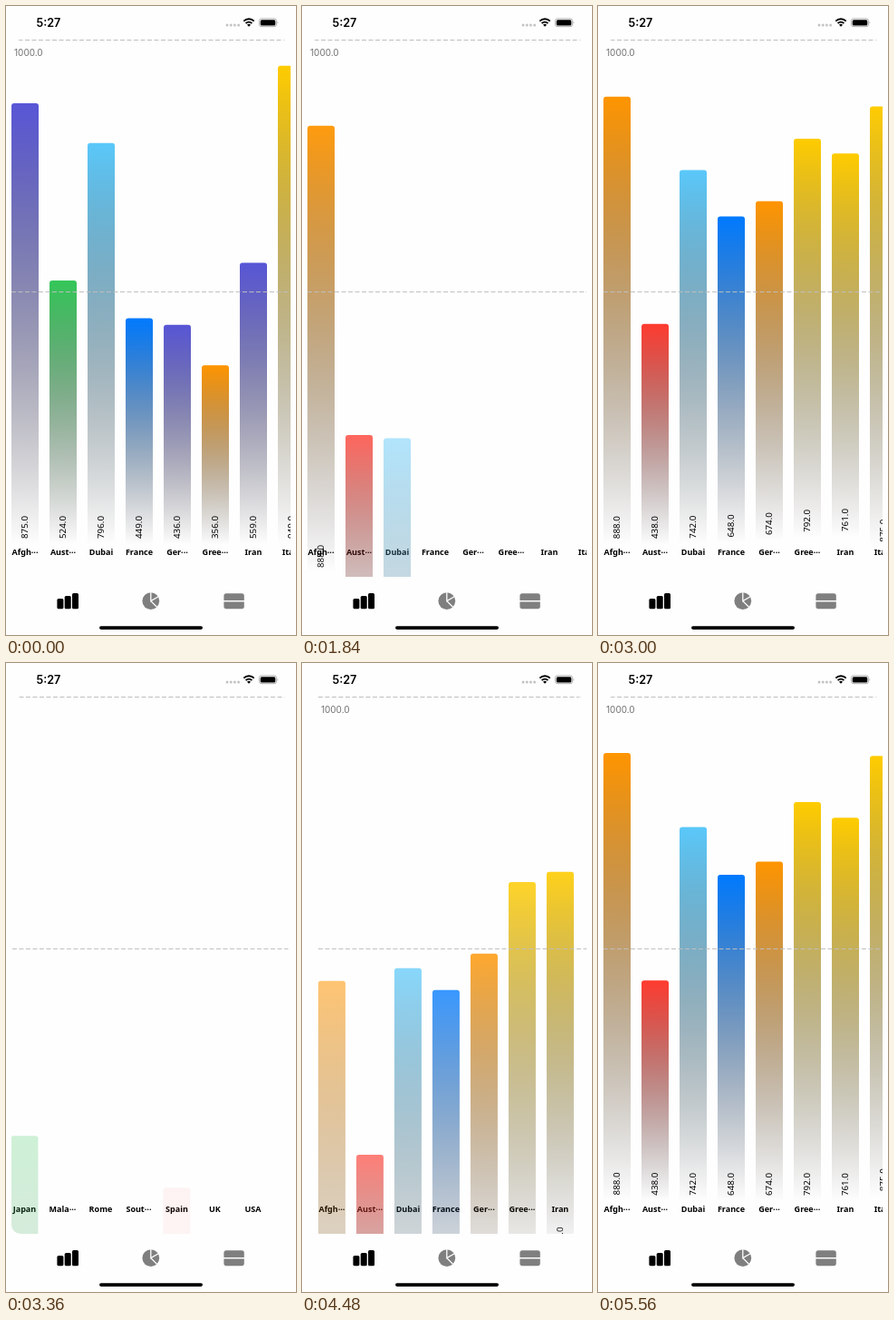
An HTML page that plays this animation: 320x692 px, repeating every 5680 ms.

```html
<!DOCTYPE html>
<html lang="en">
<head>
<meta charset="utf-8">
<title>Bar chart</title>
<style>
  html, body { margin: 0; width: 100%; height: 100%; overflow: hidden; background: #fefefe; }
  svg { display: block; width: 100%; height: 100%; }
  .clock { font: 600 12.6px Inter, sans-serif; }
  .axis { font: 10px Inter, sans-serif; fill: #707070; }
  .name { font: 600 9px "Noto Sans", "Open Sans", sans-serif; text-anchor: middle; }
  .value { font: 9.8px "Noto Sans", "Open Sans", sans-serif; text-anchor: middle; }
  .grid { stroke: #bebebe; stroke-width: 1; stroke-dasharray: 5 2.5; }
</style>
</head>
<body>
<svg viewBox="0 0 320 692" xmlns="http://www.w3.org/2000/svg">
  <defs id="defs">
    <clipPath id="view"><rect x="6" y="37" width="308" height="591" rx="10"/></clipPath>
  </defs>

  <g id="status">
    <text class="clock" x="33.5" y="22.7">5:27</text>
    <g fill="#c4c4c4">
      <circle cx="244" cy="21" r="1.5"/><circle cx="248.2" cy="21" r="1.5"/>
      <circle cx="252.4" cy="21" r="1.5"/><circle cx="256.6" cy="21" r="1.5"/>
    </g>
    <g fill="none" stroke="#000" stroke-width="1.9">
      <path d="M262.3 16.6a8.2 8.2 0 0 1 11.4 0"/>
      <path d="M264.6 19a5 5 0 0 1 6.8 0"/>
    </g>
    <path d="M268 22.8l-2-2.1a2.9 2.9 0 0 1 4 0z"/>
    <rect x="279.4" y="13.9" width="19.2" height="8.8" rx="2.6" fill="none" stroke="#a8a8a8" stroke-width=".9"/>
    <rect x="280.7" y="15.2" width="16.6" height="6.2" rx="1.5"/>
    <path d="M299.6 16.8q1.5 1.5 0 3z" fill="#a8a8a8"/>
  </g>

  <g clip-path="url(#view)">
    <g id="content">
      <text class="axis" x="9" y="55.3">1000.0</text>
      <g id="names"></g>
      <g id="bars"></g>
      <path class="grid" d="M6 37.5H648M6 314.6H648"/>
    </g>
  </g>

  <g id="tabs">
    <rect x="56.4" y="652" width="7" height="11.3" rx="1.6"/>
    <rect x="64.7" y="649" width="7" height="14.3" rx="1.6"/>
    <rect x="73" y="646" width="7" height="17.3" rx="1.6"/>
    <circle cx="159.8" cy="654.6" r="9.4" fill="#7f7f7f"/>
    <path d="M159.8 644.5V654.6L168.6 649.5M159.8 654.6L167.2 662" fill="none" stroke="#fefefe" stroke-width="1.3"/>
    <rect x="240.4" y="646.2" width="22.4" height="17" rx="2.6" fill="#7f7f7f"/>
    <path d="M240 654.7h23.4" stroke="#fefefe" stroke-width="1.5"/>
  </g>
  <rect x="103" y="682.3" width="114" height="3.6" rx="1.8"/>
</svg>

<script>
const LOOP = 5680, REFRESH = 1160, FIRST_START = 1314, STAGGER = 150;
const BASE = 593, UNIT = 0.5555, STEP = 42, TRAVEL = 555, MAX_SCROLL = 310;

const COLORS = {
  purple: '#5856d6', green: '#34c759', sky: '#5ac8fa', blue: '#007aff',
  orange: '#ff9500', yellow: '#ffcc00', red: '#ff3b30'
};

// name, first value and colour, second value and colour, start times of later entrances
const ROWS = [
  ['Afgh···', 875, 'purple', 888, 'orange', 4221],
  ['Aust···', 524, 'green', 438, 'red', 4173],
  ['Dubai', 796, 'sky', 742, 'sky', 4139],
  ['France', 449, 'blue', 648, 'blue', 4109],
  ['Ger···', 436, 'purple', 674, 'orange', 4078],
  ['Gree···', 356, 'orange', 792, 'yellow', 4060],
  ['Iran', 559, 'purple', 761, 'yellow', 4014],
  ['Italy', 949, 'yellow', 875, 'yellow', 3885, 4515],
  ['Japan', 0, 'green', 890, 'green', 3221, 3634],
  ['Mala···', 0, 'orange', 638, 'orange', 3247],
  ['Rome', 0, 'green', 146, 'green', 3264],
  ['Sout···', 0, 'orange', 616, 'orange', 3296],
  ['Spain', 0, 'red', 971, 'red', 3302],
  ['UK', 0, 'green', 275, 'green', 3344],
  ['USA', 0, 'sky', 216, 'sky', 3380]
];

const byId = id => document.getElementById(id);

function add(parent, tag, attrs, text) {
  const el = document.createElementNS('http://www.w3.org/2000/svg', tag);
  for (const key in attrs) el.setAttribute(key, attrs[key]);
  if (text) el.textContent = text;
  return parent.appendChild(el);
}

for (const key in COLORS) {
  const grad = add(byId('defs'), 'linearGradient', { id: key, x1: 0, y1: 0, x2: 0, y2: 1 });
  add(grad, 'stop', { offset: 0, 'stop-color': COLORS[key] });
  add(grad, 'stop', { offset: 1, 'stop-color': '#000', 'stop-opacity': 0 });
}

function makeBar(x, value, color) {
  const g = add(byId('bars'), 'g', {});
  const height = value * UNIT;
  add(g, 'rect', { x: x - 15, y: BASE - height, width: 30, height, rx: 3, fill: `url(#${color})` });
  add(g, 'text', { class: 'value', transform: `translate(${x + 3} 573.5) rotate(-90)` }, value.toFixed(1));
  return g;
}

const bars = ROWS.map(([name, v1, c1, v2, c2, ...later], i) => {
  const x = 21 + i * STEP;
  add(byId('names'), 'text', { class: 'name', x, y: 603.6 }, name);
  const starts = i < 8 ? [FIRST_START + i * STAGGER, ...later] : later;
  return { before: v1 ? makeBar(x, v1, c1) : null, after: makeBar(x, v2, c2), starts };
});

// Remaining distance of a spring with a 1 s response and damping 0.8, from 1 to 0
function spring(ms) {
  if (ms <= 0) return 1;
  const s = ms / 1000 * 2 * Math.PI;
  return Math.exp(-0.8 * s) * (Math.cos(0.6 * s) + 4 / 3 * Math.sin(0.6 * s));
}

// Overscroll after hitting an edge at the given speed (px per ms)
const bounce = (speed, ms) => speed * ms * Math.exp(-0.00918 * ms);

const FLICK = 3140, SPEEDUP = 146, SPEED = 2.3, RIGHT_EDGE = 3348;
const RETURN = 3950, LEFT_EDGE = 4250, RETURN_SPEED = 0.43;

function scrollAt(t) {
  if (t < FLICK) return 0;
  if (t < RIGHT_EDGE) {
    const d = t - FLICK;
    return d < SPEEDUP ? SPEED * d * d / (2 * SPEEDUP) : SPEED * (d - SPEEDUP / 2);
  }
  if (t < RETURN) return MAX_SCROLL + bounce(SPEED, t - RIGHT_EDGE);
  if (t < LEFT_EDGE) {
    const span = LEFT_EDGE - RETURN, u = (t - RETURN) / span;
    const from = MAX_SCROLL + bounce(SPEED, RETURN - RIGHT_EDGE);
    return from * (2 * u ** 3 - 3 * u * u + 1) - RETURN_SPEED * span * (u ** 3 - u * u);
  }
  return -bounce(RETURN_SPEED, t - LEFT_EDGE);
}

function place(bar, rest) {
  bar.setAttribute('transform', `translate(0 ${(rest * TRAVEL).toFixed(2)})`);
  bar.setAttribute('opacity', Math.max(0, Math.min(1, 1 - rest)).toFixed(3));
}

function render(t) {
  byId('content').setAttribute('transform', `translate(${(-scrollAt(t)).toFixed(2)} 0)`);
  for (const { before, after, starts } of bars) {
    if (before) place(before, t < REFRESH ? 0 : 1);
    // A bar leaves the list shortly before it enters again
    const start = starts.filter(s => s - 150 <= t).pop();
    place(after, start === undefined ? 1 : spring(t - start));
  }
}

function tick() {
  render(performance.now() % LOOP);
  requestAnimationFrame(tick);
}
tick();
</script>
</body>
</html>
```
